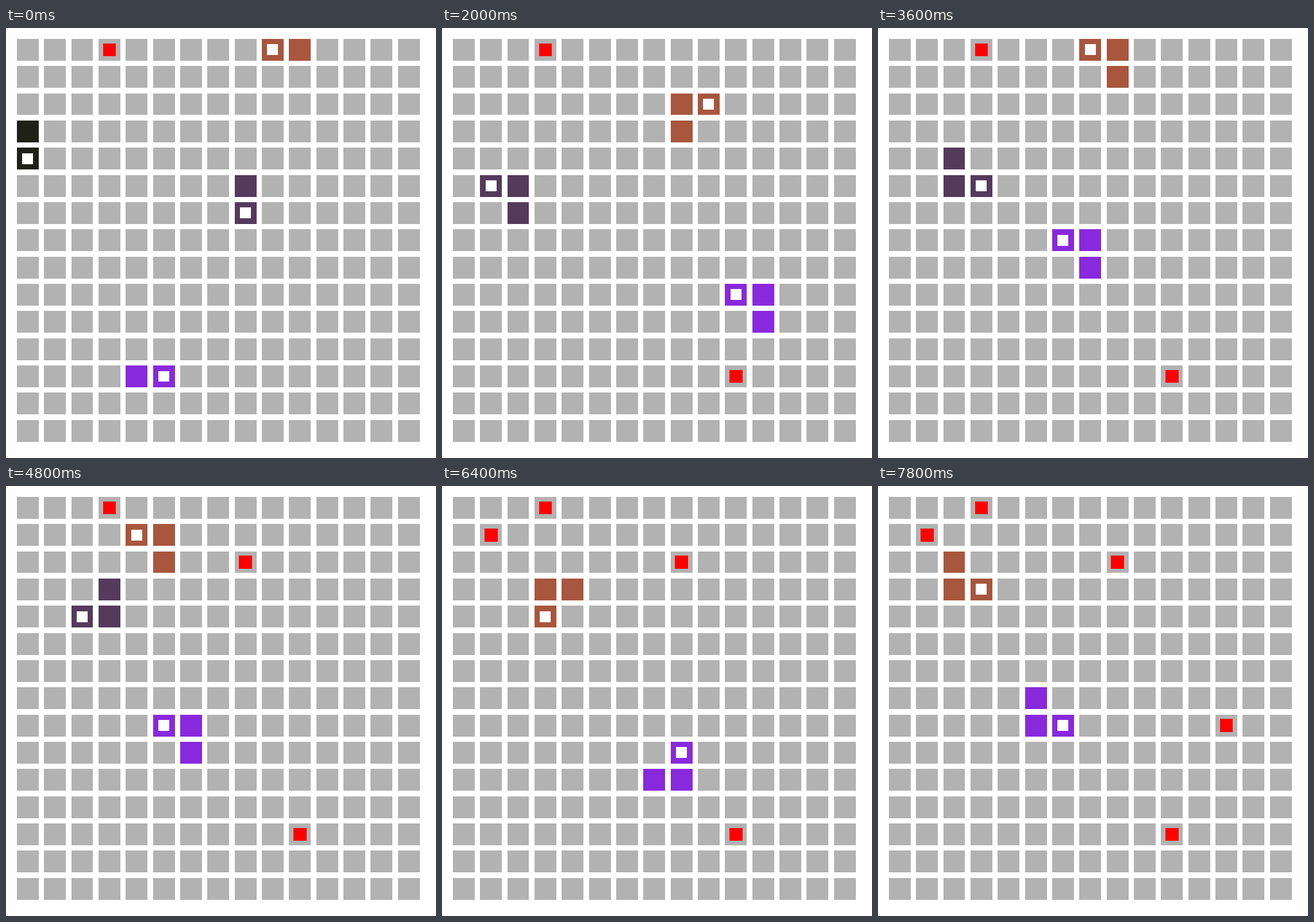
An HTML page that plays this animation: 748 by 748 pixels, repeating every 8 s.

```html
<!DOCTYPE html>
<html lang="en">
<head>
<meta charset="utf-8">
<title>Snakes on a grid</title>
<style>
  html, body { margin: 0; width: 100%; height: 100%; overflow: hidden; background: #fff; }
  svg { display: block; width: 100%; height: 100%; }
</style>
</head>
<body>
<svg id="stage" viewBox="0 0 748 748" shape-rendering="crispEdges"></svg>
<script>
const STEP = 200, STEPS = 40, CELLS = 15, LENGTH = 3;
const PITCH = 748 / 15.8;
const DIRS = { L: [-1, 0], R: [1, 0], U: [0, -1], D: [0, 1] };

// A snake vanishes when its moves run out.
const snakes = [
  { color: '#a8563d', start: [10, 0], moves: 'L DDDL URDLUR DRULUL UL DLDLUL LDRRDL LD LURULDR' },
  { color: '#8829dd', start: [4, 12], moves: 'R RURR RRURUL ULDLLU UL DLDRUL LDRDRR RU ULULLDR' },
  { color: '#553a5b', start: [8, 5], moves: 'D LLLL LDLUUL LURURD DR URULDL UU' },
  { color: '#1f2018', start: [0, 3], moves: 'D DRDD LD' }
];

const foods = [
  { at: [3, 0], from: 0 },
  { at: [10, 12], from: 2 },
  { at: [8, 2], from: 21 },
  { at: [1, 1], from: 28 },
  { at: [12, 8], from: 35 }
];

const stage = document.getElementById('stage');

function walk({ start, moves }) {
  const path = [start];
  for (const m of moves.replace(/ /g, '')) {
    const [x, y] = path[path.length - 1];
    path.push([x + DIRS[m][0], y + DIRS[m][1]]);
  }
  return path;
}

// Square centred in a cell; size is a fraction of the pitch.
function square([col, row], size, fill) {
  const inset = 0.4 + (0.8 - size) / 2;
  const edge = v => Math.round(v * PITCH);
  const x = edge(col + inset), y = edge(row + inset);
  const w = edge(col + inset + size) - x, h = edge(row + inset + size) - y;
  return `<rect x="${x}" y="${y}" width="${w}" height="${h}" fill="${fill}"/>`;
}

function drawSnake({ path, color }, step) {
  const head = step + 1;
  if (head >= path.length) return '';
  const body = path.slice(Math.max(0, head - LENGTH + 1), head + 1);
  return body.map(p => square(p, 0.8, color)).join('') + square(path[head], 0.4, '#fff');
}

let board = '';
for (let i = 0; i < CELLS * CELLS; i++) {
  board += square([i % CELLS, Math.floor(i / CELLS)], 0.8, '#b2b2b2');
}
stage.innerHTML = board + '<g id="live"></g>';
const live = document.getElementById('live');

for (const s of snakes) s.path = walk(s);

let shown = -1;
function render(ms) {
  const step = Math.floor(ms / STEP) % STEPS;
  if (step === shown) return;
  shown = step;
  live.innerHTML =
    foods.filter(f => step >= f.from).map(f => square(f.at, 0.48, '#f00')).join('') +
    snakes.map(s => drawSnake(s, step)).join('');
}

const begin = performance.now();
function tick() {
  render(performance.now() - begin);
  requestAnimationFrame(tick);
}
tick();
</script>
</body>
</html>
```
